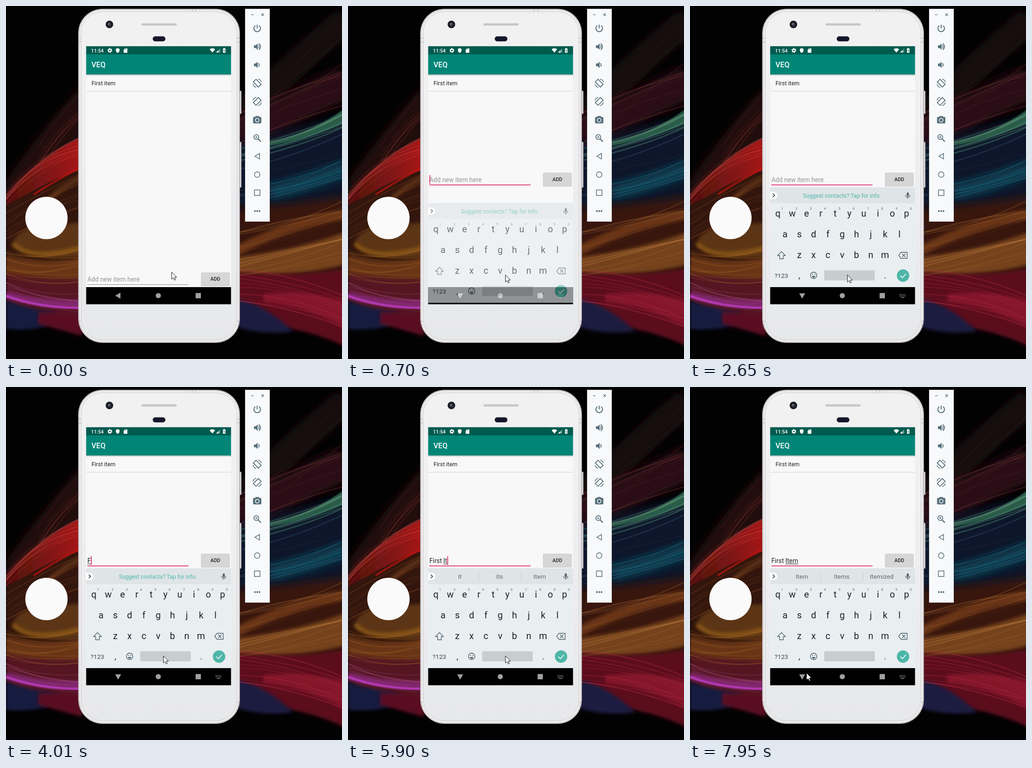
Write an HTML page that moves like this. It is 731 px wide and 766 px high and loops after 8 s.

```html
<!DOCTYPE html>
<html lang="en">
<head>
<meta charset="utf-8">
<title>Adding a list item</title>
<style>
  html, body { margin: 0; width: 100%; height: 100%; overflow: hidden; background: #000; }
  svg { display: block; width: 100%; height: 100%; font-family: Roboto, sans-serif; }
  text { white-space: pre; }
  .mid { text-anchor: middle; }
</style>
</head>
<body>
<svg id="stage" viewBox="0 0 731 766"></svg>
<script>
const LOOP = 8000, PINK = '#d81b60', TEAL = '#4db6a8';

// ---- markup helpers ----
const rect = (x, y, w, h, fill, more = '') =>
  `<rect x="${x}" y="${y}" width="${w}" height="${h}" fill="${fill}" ${more}/>`;
const bar = (y, h, fill, more) => rect(174, y, 316, h, fill, more);
const circle = (x, y, r, fill, more = '') => `<circle cx="${x}" cy="${y}" r="${r}" fill="${fill}" ${more}/>`;
const shape = (d, fill, more = '') => `<path d="${d}" fill="${fill}" ${more}/>`;
const line = (d, stroke, w = 1, more = '') =>
  `<path d="${d}" fill="none" stroke="${stroke}" stroke-width="${w}" ${more}/>`;
const text = (x, y, size, str, fill, more = '') =>
  `<text x="${x}" y="${y}" font-size="${size}" fill="${fill}" ${more}>${str}</text>`;
const at = (x, y, body) => `<g transform="translate(${x} ${y})">${body}</g>`;
const soft = n => `filter="url(#blur${n})"`;

// ---- wallpaper ----
let seed = 7;
const rand = () => (seed = (seed * 16807) % 2147483647) / 2147483647;

// faint fibres that follow one quadratic curve, fanning out at its ends
function strands(n, [x0, y0, cx, cy, x1, y1], spread, color) {
  let out = '';
  for (let i = 0; i < n; i++) {
    const a = (rand() - .5) * spread, b = a + (rand() - .5) * spread * .3, c = a + (rand() - .5) * spread * .4;
    out += line(`M${x0} ${y0 + a}Q${cx} ${cy + b} ${x1} ${y1 + c}`, color, .8 + rand() * 2.4,
      `opacity="${(.12 + rand() * .3).toFixed(2)}"`);
  }
  return out;
}

function wallpaper() {
  return rect(0, 0, 731, 766, '#030203') +
    // left side
    shape('M0 380Q60 290 165 170V480H0Z', '#220b0a', soft(14)) +
    shape('M0 420Q80 390 165 340V580H0Z', '#331210', soft(6)) +
    shape('M0 418Q70 325 165 284V354Q100 376 40 412L0 432Z', 'url(#red)', soft(2)) +
    line('M0 418Q70 325 165 284', '#a04a48', 1.5, soft(2)) +
    line('M60 409Q115 374 165 349', '#c81412', 3, soft(2)) +
    line('M50 470Q100 400 165 372', '#5d3115', 10, soft(6)) +
    shape('M14 520Q20 480 90 476L165 470V545Q60 555 14 520Z', '#5b3612', soft(6)) +
    line('M16 515Q50 556 165 524', '#8a5617', 9, soft(6)) +
    shape('M0 540Q80 565 165 545V610Q80 602 0 585Z', '#673416', soft(6)) +
    shape('M0 580Q80 595 165 592V705Q90 690 0 640Z', '#551224', soft(6)) +
    shape('M0 640Q50 658 110 664Q110 694 60 700Q20 704 0 700Z', '#191a40', soft(6)) +
    shape('M70 664Q120 664 165 668V716Q110 700 70 690Z', '#5a0d22', soft(6)) +
    line('M0 626Q70 648 165 646', '#82286f', 15, soft(6)) +
    line('M0 629Q70 655 165 655', '#b83abd', 5, soft(2)) +
    strands(7, [70, 335, 110, 265, 165, 220], 60, '#6b2a20') +
    strands(8, [0, 420, 70, 335, 165, 315], 50, '#d03a34') +
    strands(8, [0, 480, 80, 430, 165, 400], 60, '#8a4420') +
    strands(10, [0, 555, 70, 575, 165, 560], 70, '#b87028') +
    strands(6, [0, 610, 70, 640, 165, 640], 50, '#a04a7c') +
    // right side
    line('M500 250Q620 130 740 30', '#120708', 60, soft(14)) +
    line('M500 285Q610 225 740 165', '#2a1012', 70, soft(14)) +
    shape('M500 300L740 236V440H500Z', '#0e172b', soft(14)) +
    shape('M560 300Q660 280 740 220V252Q660 288 560 306Z', '#2b5c48', soft(2)) +
    line('M574 296Q660 276 731 236', '#6c9f81', 2, soft(2)) +
    line('M574 404Q650 388 740 352', '#0b3e50', 34, soft(14)) +
    shape('M500 440Q620 432 740 412V600H500Z', '#38170f', soft(14)) +
    line('M500 532Q620 470 740 452', '#6b3619', 20, soft(6)) +
    shape('M500 545Q630 530 740 490V560Q630 590 500 580Z', '#74431a', soft(6)) +
    shape('M500 578Q630 590 740 570V740Q640 690 500 690Z', '#5b0f1f', soft(6)) +
    shape('M560 625Q650 615 740 640V700Q650 650 560 642Z', '#841329', soft(6)) +
    shape('M500 635Q560 645 625 706Q560 715 500 696Z', '#1a1b40', soft(6)) +
    strands(9, [500, 275, 610, 215, 740, 175], 80, '#6b3232') +
    strands(6, [575, 210, 650, 140, 740, 70], 90, '#3a1818') +
    strands(6, [500, 318, 650, 285, 740, 240], 40, '#4f8b72') +
    strands(10, [500, 390, 630, 360, 740, 320], 110, '#35506e') +
    strands(6, [574, 404, 650, 388, 740, 352], 40, '#147083') +
    strands(14, [500, 540, 620, 515, 740, 480], 100, '#b4763a') +
    strands(9, [500, 610, 620, 615, 740, 660], 80, '#b02c44') +
    circle(88, 460, 46, '#fafafa');
}

// ---- phone body ----
function phone() {
  const key = 'rx="1.5" stroke="#77777b" stroke-width=".8"';
  return rect(507, 184, 5, 50, '#d9d9db', key) + rect(507, 295, 5, 99, '#d9d9db', key) +
    rect(157.5, 6.5, 351, 724, '#d5d1d4', 'rx="52" stroke="#b3abaf"') +
    rect(160, 9, 346, 719, '#f2f0f1', 'rx="50"') +
    rect(163.5, 12.5, 339, 712, 'url(#shell)', 'rx="46" stroke="#c9c7ca"') +
    line('M158 70h5M158 78h5M503 70h5M503 78h5M158 684h5M158 692h5M503 684h5M503 692h5M405 7v5M413 7v5', '#a9a5a8') +
    circle(225, 40, 8, '#15161b', 'stroke="#55575c"') + circle(225, 40, 4.5, '#30343f') + circle(224, 39, 2, '#69727f') +
    rect(295, 38, 76, 4, '#c9c9cb', 'rx="2" stroke="#b5b5b7" stroke-width=".6"') +
    rect(319.5, 66, 27, 10.5, '#14152b', 'rx="5" stroke="#54545c"');
}

// ---- emulator toolbar ----
function toolbar() {
  const c = '#546e7a', L = (d, w = 1.8) => line(d, c, w);
  const speaker = shape('M-7-3h4l4-4v14l-4-4h-4z', c);
  const turn = L('M-8.5-2.5L-2.500-8.500L8.500 2.500L2.500 8.500Z', 1.8) + L('M-9 2Q-8 8-2 9M2-9Q8-8 9-2', 1.5);
  const icons = [
    L('M0-8V0M-4-6A7.2 7.2 0 1 0 4-6', 2),
    speaker + L('M3-3.5Q5.5 0 3 3.5M3.5-7Q11 0 3.5 7'),
    speaker + L('M3-3.5Q5.5 0 3 3.5'),
    turn,
    `<g transform="scale(-1 1)">${turn}</g>`,
    rect(-9, -6, 18, 14, c, 'rx="2"') + rect(-4, -8, 8, 4, c, 'rx="1"') +
      circle(0, 1, 4, c, 'stroke="#f8f9fa" stroke-width="1.6"'),
    circle(-2, -2, 5.2, 'none', `stroke="${c}" stroke-width="1.8"`) + L('M2 2L8 8', 2.2) + L('M-4.5-2H.5M-2-4.5V.5', 1.2),
    L('M5-6V6L-5 0Z', 1.5),
    circle(0, 0, 6, 'none', `stroke="${c}" stroke-width="1.5"`),
    L('M-6-6H6V6H-6Z', 1.5),
    [-5, 0, 5].map(x => circle(x, 0, 1.9, c)).join('')
  ];
  return rect(520.5, 6.5, 53, 461, '#f8f9fa', 'stroke="#d4d8da"') +
    line('M533 19h6', c, 1.2) + line('M555.5 16l5.5 5.5m0-5.5l-5.5 5.5', c, 1.2) +
    icons.map((body, i) => at(546.5, 48.5 + i * 39.65, body)).join('');
}

// ---- app ----
function app() {
  const w = '#fff';
  return bar(87, 561, '#f8f8f8') + bar(148, 4, 'url(#drop)') +
    bar(87, 18.5, '#005a4e') + bar(105, 43.5, '#008577') +
    text(185, 100.7, 10.8, '11:54', w, 'font-weight="500"') +
    circle(226, 96.5, 2.8, 'none', 'stroke="#fff" stroke-width="2.2"') +
    circle(226, 96.5, 4.4, 'none', 'stroke="#fff" stroke-width="1.5" stroke-dasharray="2.3 2.3"') +
    shape('M243 91.5l4 1.6v3q0 4-4 5.6q-4-1.6-4-5.6v-3z', w) +
    shape('M259 92h5v9.5h-8v-6.5z', w) + line('M259.5 93v2M261.3 93v2', '#005a4e', .8) +
    shape('M443 94q6-4.5 12 0l-6 7z', w) +
    shape('M466 92v9h-9z', w, 'opacity=".4"') + shape('M462 96v5h-5z', w) +
    rect(472, 92.2, 5.5, 9.3, w, 'rx=".8"') + rect(473.5, 91.2, 2.5, 2, w) + line('M475 94l-1 3h1.6l-1 3', '#005a4e', .9) +
    text(186, 133, 16, 'VEQ', w, 'font-weight="500"') +
    text(186, 171.5, 12.4, 'First item', '#222') +
    bar(184, 1.8, '#e2e2e2');
}

function form() {
  return `<g id="form">` +
    rect(424, 578.7, 63, 29.5, '#000', 'rx="2" opacity=".16"') + rect(424.5, 578, 62, 28.5, '#d6d6d6', 'rx="2"') +
    text(455.5, 596.3, 10.8, 'ADD', '#222', 'class="mid" font-weight="500"') +
    rect(177, 604, 220, 1, '#8a8a93', 'id="base"') +
    text(177, 598.3, 13.75, 'Add new item here', '#949494', 'id="hint"') +
    text(177, 598.3, 13.75, '', '#222', 'id="entry"') +
    rect(177, 600, 0, 1, '#222', 'id="under"') +
    rect(177, 583.5, 1.6, 19, PINK, 'id="caret"') + `</g>`;
}

function navBar() {
  const c = '#a0a0a0';
  let keys = '';
  for (let i = 0; i < 15; i++) keys += rect(456 + i % 5 * 2.7, 625 + (i / 5 | 0) * 2.3, 1.4, 1.2, c);
  return bar(610, 38, '#000') +
    shape('M249 622V635L237.5 628.5Z', c, 'id="back"') +
    `<g id="hide">${shape('M237.5 623.5H250.5L244 635Z', c)}${keys}${rect(459, 632, 7, 1.2, c)}</g>` +
    circle(331.3, 628.5, 5.6, c) + rect(412.5, 622.8, 11.5, 11.5, c);
}

function keyboard() {
  const ink = '#16262c', grey = '#455a64';
  const row = (chars, x, y) => [...chars].map((ch, i) =>
    text(x + i * 31.1, y, 20, ch, ink, 'class="mid"')).join('');
  const digits = [...'1234567890'].map((ch, i) =>
    text(200.5 + i * 31.1, 441.5, 7.8, ch, '#5d6c73', 'class="mid"')).join('');
  return `<g id="keys">` +
    bar(393.5, 216.5, '#e9eef1') + bar(393.5, 34.5, '#dfe4e7') +
    rect(174, 403, 8, 16, '#fff') + circle(182, 411, 8, '#fff') + line('M180 407l4 4l-4 4', '#263238', 1.6) +
    text(330.5, 416, 12.25, 'Suggest contacts? Tap for info.', TEAL, 'class="mid" id="tip"') +
    `<g id="words">${[243.5, 330, 417].map(x => text(x, 416, 13.5, '', '#5f6c72', 'class="mid"')).join('')}` +
    line('M284.5 402v18M376.5 402v18', '#c9cfd2') + `</g>` +
    rect(471.5, 404.5, 4.5, 8.5, '#546369', 'rx="2.2"') +
    line('M469 410q0 5 4.7 5t4.7-5M473.7 415v3', '#546369', 1.3) +
    row('qwertyuiop', 191.3, 457) + digits + row('asdfghjkl', 206.8, 502) + row('zxcvbnm', 237.7, 547) +
    line('M199 533L207.5 541.5H203V548.5H195V541.5H190.5Z', grey, 1.3) +
    line('M459 534.5H472.5V547.5H459L454 541ZM461.5 537.5l7 7m0-7l-7 7', grey, 1.3) +
    text(184, 589.5, 13.7, '?123', '#37474f') +
    text(238, 591, 18, ',', ink, 'class="mid"') + text(424.5, 591, 18, '.', ink, 'class="mid"') +
    circle(269, 584.5, 7, 'none', `stroke="${grey}" stroke-width="1.4"`) +
    circle(266.5, 582.5, 1.1, grey) + circle(271.5, 582.5, 1.1, grey) + shape('M265 586h8q-1.5 3.5-4 3.5t-4-3.5z', grey) +
    rect(292, 573.5, 110, 22, '#c8cdd0', 'rx="2"') +
    circle(463.5, 585, 13.5, TEAL) + line('M457.5 585l4.5 4.5l8-8.5', '#fff', 1.7) + `</g>`;
}

const blurs = [2, 6, 14].map(n =>
  `<filter id="blur${n}" x="-30%" y="-60%" width="160%" height="220%"><feGaussianBlur stdDeviation="${n * .6}"/></filter>`).join('');
const stage = document.getElementById('stage');
stage.innerHTML = `<defs>${blurs}
  <linearGradient id="red"><stop stop-color="#4d1110"/><stop offset="1" stop-color="#a81615"/></linearGradient>
  <linearGradient id="shell" x2="0" y2="1"><stop stop-color="#f1f1f2"/><stop offset=".3" stop-color="#f0f0f1"/><stop offset="1" stop-color="#e7e8ea"/></linearGradient>
  <linearGradient id="drop" x2="0" y2="1"><stop stop-color="#aaa"/><stop offset="1" stop-color="#f8f8f8"/></linearGradient>
  <clipPath id="screen">${rect(174.4, 87.3, 315.2, 560, '#000')}</clipPath></defs>` +
  wallpaper() + phone() + toolbar() +
  `<g clip-path="url(#screen)">${app()}${form()}${navBar()}${keyboard()}</g>` +
  `<path id="mouse" d="M.5 .5V16L4 12.7L6.5 18L8.9 17L6.5 11.8H11.3Z" fill="#fff" stroke="#111" stroke-width="1"/>`;

// ---- timeline: each step changes part of the state and holds ----
const start = { mouse: [360, 577], focus: false, up: false, slide: 40, alpha: 0, caret: false, entry: '', words: '' };
const steps = [
  [120, { mouse: [354, 580] }],
  [270, { mouse: [345, 587] }],
  [420, { mouse: [342, 583] }],
  [550, { focus: true, caret: true }],
  [700, { up: true, slide: 34, alpha: .62 }],
  [850, { slide: 0, alpha: 1, caret: false }],
  [1130, { caret: true }], [1660, { caret: false }],
  [2220, { caret: true }], [2650, { caret: false }],
  [3210, { caret: true }], [3640, { caret: false }],
  [4010, { caret: true, entry: 'F' }],
  [4160, { entry: 'Fi' }],
  [4410, { entry: 'Fir' }],
  [4680, { entry: 'Firs' }],
  [4810, { entry: 'First', words: 'First Firstly Firsts' }],
  [5070, { entry: 'First ', words: 'thing time one' }],
  [5500, { caret: false }],
  [5650, { caret: true, entry: 'First I', words: 'I It Is' }],
  [5860, { entry: 'First It', words: 'It Its Item' }],
  [6010, { entry: 'First Ite', words: 'Item Items Iteration' }],
  [6290, { entry: 'First Item', words: 'Item Items Itemized' }],
  [6790, { caret: false }], [7220, { caret: true }],
  [7370, { mouse: [334, 592] }],
  [7520, { mouse: [298, 616] }],
  [7670, { mouse: [262, 632], caret: false }],
  [7800, { mouse: [255, 626] }],
  [7950, { mouse: [253, 620] }]
];

const el = id => document.getElementById(id);
const set = (id, attrs) => Object.entries(attrs).forEach(([k, v]) => el(id).setAttribute(k, v));
const show = (id, on) => set(id, { visibility: on ? 'visible' : 'hidden' });
const pen = document.createElement('canvas').getContext('2d');
pen.font = '13.75px Roboto, sans-serif';
const widthOf = str => pen.measureText(str).width;

function render(s) {
  set('mouse', { transform: `translate(${s.mouse})` });
  set('form', { transform: `translate(0 ${s.up ? -216.5 : 0})` });
  set('base', { fill: s.focus ? PINK : '#8a8a93', height: s.focus ? 1.6 : 1 });
  show('hint', !s.entry);
  el('entry').textContent = s.entry;
  const from = widthOf(s.entry.slice(0, s.entry.lastIndexOf(' ') + 1)), end = widthOf(s.entry);
  set('under', { x: 177 + from, width: end - from });
  set('caret', { x: 177.2 + end });
  show('caret', s.caret);
  show('back', !s.up);
  show('hide', s.up);
  set('keys', { transform: `translate(0 ${s.slide})`, opacity: s.alpha });
  show('tip', !s.words);
  show('words', s.words);
  const list = s.words.split(' ');
  el('words').querySelectorAll('text').forEach((node, i) => node.textContent = list[i] || '');
}

let shown = -1;
function tick() {
  const t = performance.now() % LOOP;
  const past = steps.filter(([time]) => time <= t);
  if (past.length !== shown) {
    shown = past.length;
    render(Object.assign({}, start, ...past.map(step => step[1])));
  }
  requestAnimationFrame(tick);
}
tick();
</script>
</body>
</html>
```
